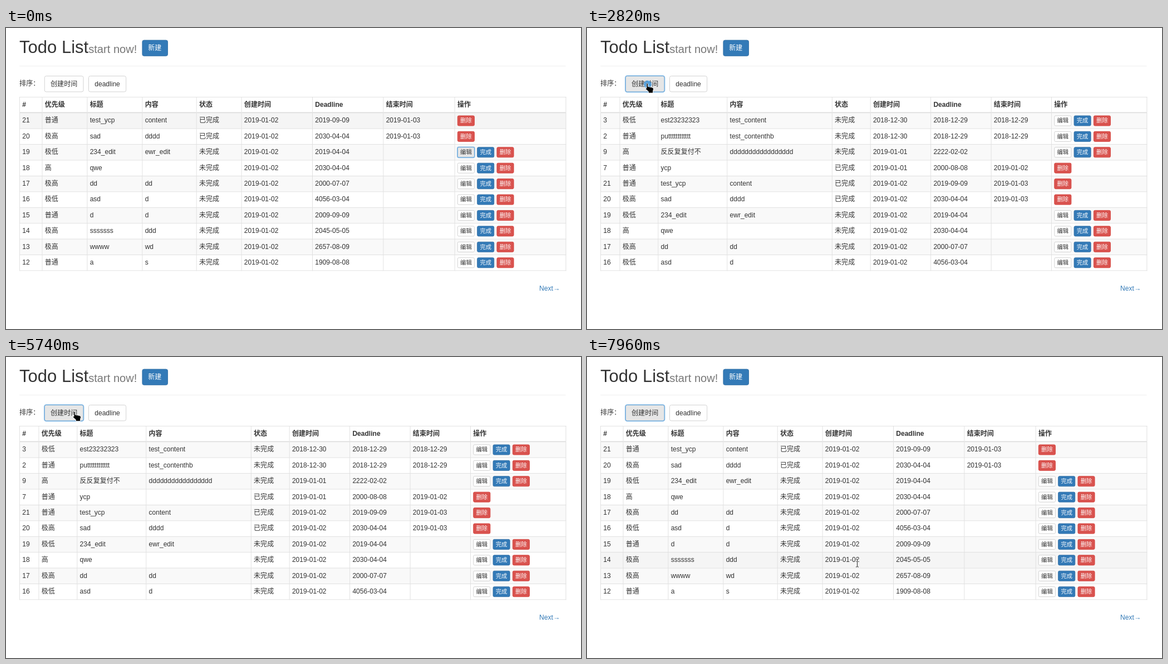
Recreate the animation shown at these times as an HTML page. Size 1033x542 px, loop 8 s.

```html
<!DOCTYPE html>
<html lang="zh-CN">
<head>
<meta charset="utf-8">
<title>Todo List</title>
<style>
html, body { margin: 0; width: 100%; height: 100%; overflow: hidden; background: #fff; }
* { box-sizing: border-box; }
#page {
  position: absolute; left: 0; top: 0; width: 1200px; height: 629px; padding: 20px 32px 0 28px;
  transform: scale(calc(1033 / 1200)); transform-origin: 0 0; color: #333;
  font: 14px/20px "Liberation Sans", Arial, "Noto Sans CJK SC", "Noto Sans CJK", sans-serif;
}
header { height: 60px; border-bottom: 1px solid #eee; margin-bottom: 20px; }
h1 { margin: 0; font-size: 36px; font-weight: 500; line-height: 1.1; white-space: nowrap; }
small { font-size: 65%; font-weight: 400; line-height: 1; color: #777; }
.btn {
  display: inline-block; vertical-align: middle; padding: 6px 12px; height: 34px;
  border: 1px solid #ccc; border-radius: 4px; background: #fff; color: #333;
  font-size: 14px; font-weight: 400; line-height: 20px;
}
.primary { background: #337ab7; border-color: #2e6da4; color: #fff; }
.danger { background: #d9534f; border-color: #d43f3a; color: #fff; }
.hover { background: #e6e6e6; border-color: #adadad; }
.focus { background: #e6e6e6; border-color: #5d9fd6; box-shadow: 0 0 0 1px #8fc1ea; }
.sort { height: 34px; margin-bottom: 10px; }
.sort .btn { margin-left: 10px; }
table { width: 1140px; table-layout: fixed; border-collapse: collapse; }
th, td { border: 1px solid #ddd; padding: 5px; text-align: left; vertical-align: top; white-space: nowrap; }
th { height: 32px; border-bottom-width: 2px; }
td { height: 33px; }
tbody tr:nth-child(odd) { background: #f9f9f9; }
tbody tr.over { background: #f5f5f5; }
.actions { display: flex; gap: 5px; height: 22px; }
.actions .btn { height: 22px; padding: 1px 5px; border-radius: 3px; font-size: 12px; line-height: 18px; }
.next { position: absolute; left: 1113px; top: 534px; color: #337ab7; white-space: nowrap; }
svg { position: absolute; left: 0; top: 0; pointer-events: none; }
</style>
</head>
<body>
<div id="page">
  <header><h1>Todo List<small>start now!</small> <span class="btn primary">新建</span></h1></header>
  <div class="sort">排序：<span class="btn" id="byCreated">创建时间</span><span class="btn">deadline</span></div>
  <div id="tables"></div>
  <div class="next">Next→</div>
</div>
<svg width="1033" height="542">
  <g id="cursor">
    <circle id="press" r="7" cx="1" cy="2" fill="#3d9be5" fill-opacity=".75"/>
    <path id="arrow" d="M0 0V15.5L4 13L10.5 12V10.5Z" fill="#000" stroke="#fff" stroke-width=".7"/>
    <g id="beam" fill="none">
      <path d="M-2.5-7H2.5M0-7V7M-2.5 7H2.5" stroke="#fff" stroke-width="2.6"/>
      <path d="M-2.5-7H-.6L0-6.4L.6-7H2.5M0-6.4V6.4M-2.5 7H-.6L0 6.4L.6 7H2.5" stroke="#222" stroke-width="1"/>
    </g>
    <path id="hand" d="M-1 1Q0-1 1.5 1V6L9 7.5Q11.5 8 11.5 10.5L10.5 14V17.5H2.5V15L-2.5 10.5Q-3.5 8.5-1 9Z"
      fill="#000" stroke="#fff" stroke-width=".8"/>
  </g>
</svg>
<script>
const $ = id => document.getElementById(id);
const LOOP = 8000, FIRST_SORT = 2740, SECOND_SORT = 6220;
const headings = ['#', '优先级', '标题', '内容', '状态', '创建时间', 'Deadline', '结束时间', '操作'];

const newestRows = `21|普通|test_ycp|content|已完成|2019-01-02|2019-09-09|2019-01-03
20|极高|sad|dddd|已完成|2019-01-02|2030-04-04|2019-01-03
19|极低|234_edit|ewr_edit|未完成|2019-01-02|2019-04-04|
18|高|qwe||未完成|2019-01-02|2030-04-04|
17|极高|dd|dd|未完成|2019-01-02|2000-07-07|
16|极低|asd|d|未完成|2019-01-02|4056-03-04|
15|普通|d|d|未完成|2019-01-02|2009-09-09|
14|极高|sssssss|ddd|未完成|2019-01-02|2045-05-05|
13|极高|wwww|wd|未完成|2019-01-02|2657-08-09|
12|普通|a|s|未完成|2019-01-02|1909-08-08|`.split('\n');

const oldestRows = [
  '3|极低|est23232323|test_content|未完成|2018-12-30|2018-12-29|2018-12-29',
  '2|普通|putttttttttttt|test_contenthb|未完成|2018-12-30|2018-12-29|2018-12-29',
  '9|高|反反复复付不|ddddddddddddddddd|未完成|2019-01-01|2222-02-02|',
  '7|普通|ycp||已完成|2019-01-01|2000-08-08|2019-01-02',
  ...newestRows.slice(0, 6)
];

const button = (label, kind = '') => `<span class="btn ${kind}">${label}</span>`;
const cell = (tag, text) => `<${tag}><span class="text">${text}</span></${tag}>`;

function rowHtml(row) {
  const actions = row.includes('已完成') ? '' : button('编辑', 'edit') + button('完成', 'primary');
  return `<tr>${row.split('|').map(text => cell('td', text)).join('')}
    <td><div class="actions">${actions}${button('删除', 'danger')}</div></td></tr>`;
}

function addTable(widths, rows) {
  const table = document.createElement('table');
  table.innerHTML = `<colgroup>${widths.map(w => `<col style="width:${w}px">`).join('')}</colgroup>
    <thead><tr>${headings.map(text => cell('th', text)).join('')}</tr></thead>
    <tbody>${rows.map(rowHtml).join('')}</tbody>`;
  $('tables').append(table);
  return table;
}

const newest = addTable([47, 94, 115, 113, 94, 148, 148, 149, 232], newestRows);
const oldest = addTable([40, 80, 144, 219, 80, 126, 126, 126, 199], oldestRows);
const firstEdit = newest.querySelector('.edit');

// Pointer path: time, x, y
const path = [
  [0, 330, 165], [629, 330, 165], [630, 330, 186], [740, 330, 186], [1470, 210, 424], [1600, 210, 424],
  [1920, 167, 138], [2400, 108, 99.5], [2820, 108, 99.5], [3460, 400, 345], [3580, 400, 345],
  [3840, 520, 135], [4100, 574, 264.6], [4420, 590, 300], [4800, 600, 494], [5260, 500, 297],
  [5700, 123, 98], [5860, 123, 98], [6100, 118, 100], [6300, 118, 100], [6940, 476, 148.5], [7080, 476, 148.5],
  [7920, 485.5, 367], [7960, 485.5, 371], [LOOP, 485.5, 371]
];

function pointerAt(t) {
  const i = path.findIndex(key => key[0] > t);
  const [t0, x0, y0] = path[i - 1], [t1, x1, y1] = path[i];
  const u = (t - t0) / (t1 - t0), ease = u * u * (3 - 2 * u);
  return [x0 + (x1 - x0) * ease, y0 + (y1 - y0) * ease];
}

const show = (el, on) => { el.style.display = on ? '' : 'none'; };
const within = (t, from, to) => t >= from && t < to;

function draw(now) {
  const t = now % LOOP;
  const sorted = within(t, FIRST_SORT, SECOND_SORT);
  show(oldest, sorted);
  show(newest, !sorted);
  firstEdit.classList.toggle('focus', t < FIRST_SORT);

  const [x, y] = pointerAt(t);
  const target = document.elementFromPoint(x, y);
  const hoveredRow = target?.closest('tbody tr');
  document.querySelectorAll('tbody tr').forEach(row => row.classList.toggle('over', row === hoveredRow));

  const sortButton = $('byCreated');
  sortButton.classList.toggle('hover', target === sortButton);
  sortButton.classList.toggle('focus', t >= FIRST_SORT);

  const shape = target?.closest('.btn') ? 'hand' : target?.closest('.text') ? 'beam' : 'arrow';
  for (const id of ['hand', 'beam', 'arrow']) show($(id), id === shape);
  show($('press'), within(t, 2700, 2860) || within(t, 6140, 6300));
  show($('cursor'), t >= 780);
  $('cursor').setAttribute('transform', `translate(${x} ${y})`);
}

const start = performance.now();
function frame() {
  draw(performance.now() - start);
  requestAnimationFrame(frame);
}
frame();
</script>
</body>
</html>
```
